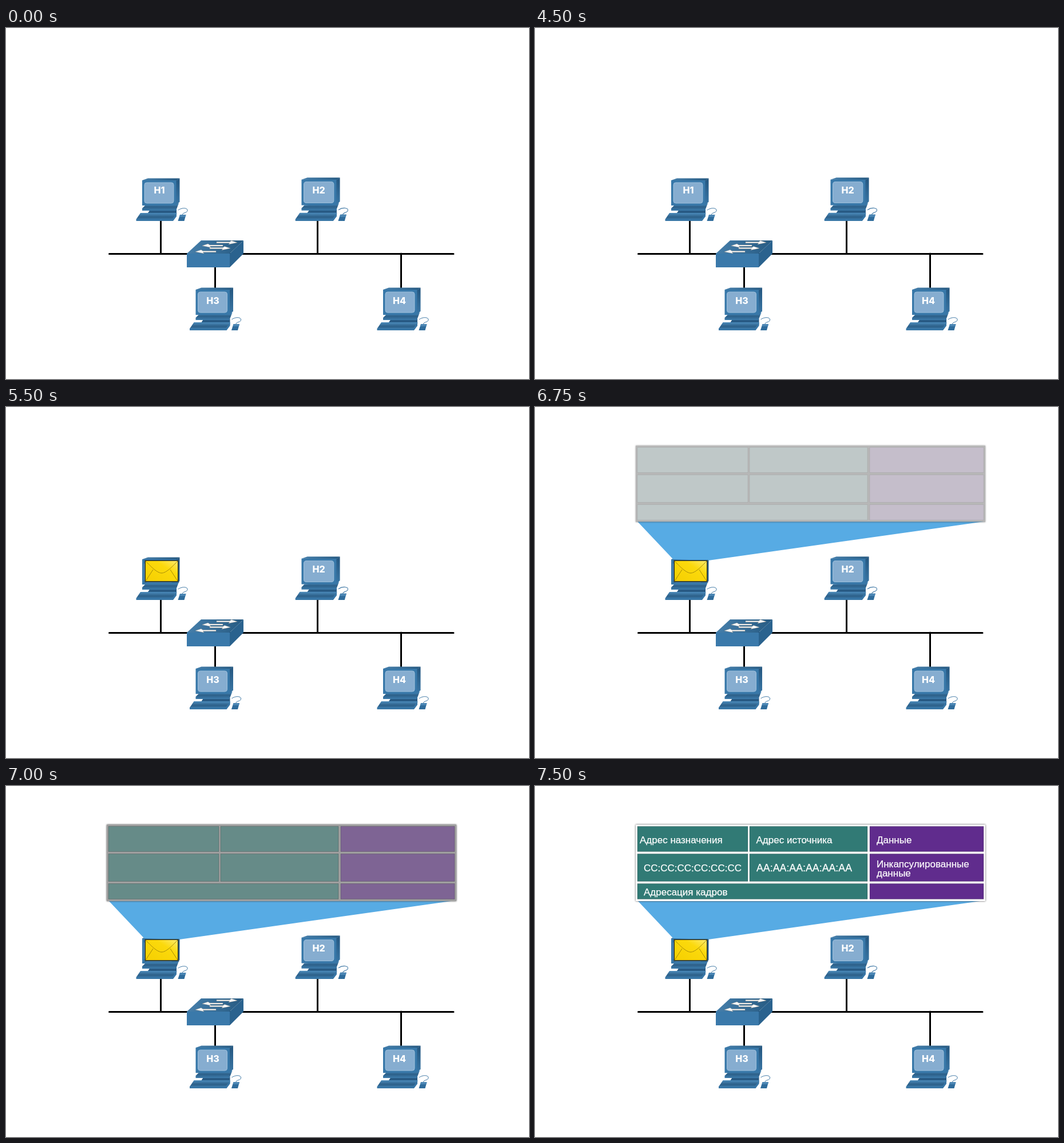
Recreate the animation shown at these times as an HTML page. Size 914x613 px, loop 8 s.

```html
<!DOCTYPE html>
<html lang="ru">
<head>
<meta charset="utf-8">
<style>
  html, body { margin: 0; height: 100%; overflow: hidden; background: #fff; }
  svg { display: block; font: 17px "Liberation Sans", Arial, sans-serif; }
  .label { font: 800 16px Inter, sans-serif; fill: #fff; text-anchor: middle; }
  .wire { fill: none; stroke: #000; stroke-width: 3; stroke-linecap: round; }
  #bubble { filter: drop-shadow(1px 1px 1.5px #9aa); }
  #frame { filter: drop-shadow(0 0 1.5px #444); }
  #address, #payload { stroke: #0003; }
  #words { fill: #fff; stroke: #fff; stroke-width: .25; }
</style>
</head>
<body>
<svg width="914" height="613" viewBox="0 0 914 613">
  <defs>
    <linearGradient id="metal" x2="0" y2="1">
      <stop stop-color="#4b8bbb"/><stop offset=".5" stop-color="#2d6089"/><stop offset="1" stop-color="#3d7cac"/>
    </linearGradient>
    <linearGradient id="side" x2="0" y2="1">
      <stop stop-color="#24567f"/><stop offset="1" stop-color="#3a77a6"/>
    </linearGradient>
    <linearGradient id="lid">
      <stop stop-color="#467fab"/><stop offset="1" stop-color="#265a82"/>
    </linearGradient>
    <linearGradient id="gold" x1="0" y1="1" x2="1" y2="0">
      <stop stop-color="#f5cf00"/><stop offset=".65" stop-color="#fbd90c"/><stop offset="1" stop-color="#fdeb70"/>
    </linearGradient>
    <g id="pc">
      <path d="M301 318C308 313 318 314 317 319S309 321 308 327" fill="none" stroke="#3f78a5"/>
      <path d="M304 326h10.500l-3 11h-11z" fill="#2f6c9c"/>
      <path d="M304.500 326h10l-1 4h-10.500z" fill="#4b86b4"/>
      <path d="M252 317h46v6l-6 3h-46z" fill="#285a84"/>
      <path d="M243 310l59-4-5 13h-59v-4z" fill="url(#metal)"/>
      <path d="M235 323h63.500l-1 6-6 8h-64v-3z" fill="url(#metal)"/>
      <path d="M228 333h63l7-9v5l-6 8h-64z" fill="#3876a6"/>
      <path d="M238 266l10-3.500h55.500l-6 4.500z" fill="url(#lid)"/>
      <path d="M297 267l6.500-4.500v41l-6.500 6.500z" fill="url(#side)"/>
      <path d="M238 266h59.500v44H238z" fill="#3878a9"/>
      <rect x="242" y="270" width="51" height="36" rx="4" fill="#86add0" stroke="#9dbfdb"/>
    </g>
    <path id="arrow" d="M-1-1H22l3-2 10 3.300-15 3 2-2.300H-1z" fill="#fff" stroke="#b9a58f" stroke-width=".4"/>
  </defs>

  <path class="wire" d="M180.500 394.500H782M270.500 337V394M544.500 337V394M365.500 418V453M690.500 394V453"/>

  <path d="M316 394l25-23h74l-24 23z" fill="url(#lid)"/>
  <path d="M391 394l24-23v23l-24 24z" fill="#2a628e"/>
  <path d="M316 394h75v24h-75z" fill="#3a79aa"/>
  <use href="#arrow" x="369" y="374.500"/>
  <use href="#arrow" transform="translate(378 380) scale(-1 1)"/>
  <use href="#arrow" x="357" y="384.500"/>
  <use href="#arrow" transform="translate(366 390.500) scale(-1 1)"/>

  <use href="#pc"/>
  <use href="#pc" transform="translate(272.500 -6) scale(1.025 1.018)"/>
  <use href="#pc" x="93.500" y="191"/>
  <use href="#pc" x="421" y="191"/>
  <g class="label">
    <text x="268" y="288.500">H1</text><text x="546.500" y="288.500">H2</text>
    <text x="361.500" y="481.500">H3</text><text x="687.500" y="481.500">H4</text>
  </g>

  <g id="bubble">
    <rect x="21" y="266.500" width="169.500" height="129" rx="7" fill="#fff" stroke="#24356a" stroke-width="1.800"/>
    <path d="M191.500 320L212 338H191.500z" fill="#fff"/>
  </g>
  <g id="speech">
    <text x="28" y="290">Мне нужно</text><text x="28" y="318">отправить</text>
    <text x="28" y="346">информацию на</text><text x="28" y="374">H3.</text>
  </g>

  <path id="beam" fill="#57abe4"/>

  <g id="mail">
    <path d="M242 267h60.500v39.500H242z" fill="#2c5573"/>
    <path d="M243.500 268.500h57v36h-57z" fill="url(#gold)" stroke="#3b3410"/>
    <path d="M244 269C258 284 266 290 272 290S286 284 300 269M244 304L257 284M300 304L287 284" fill="none" stroke="#a58a08"/>
  </g>

  <g id="table">
    <rect id="frame" x="176" y="67.500" width="611" height="133.500"/>
    <path id="address" d="M179 70.500h193v44H179zM375 70.500h206v44H375zM179 118.500h193v48H179zM375 118.500h206v48H375zM179 170.500h402v27H179z"/>
    <path id="payload" d="M585 70.500h199v44H585zM585 118.500h199v48H585zM585 170.500h199v27H585z"/>
    <g id="words">
      <text x="183" y="100">Адрес назначения</text>
      <text x="386.500" y="100">Адрес источника</text>
      <text x="597" y="100">Данные</text>
      <text x="190" y="149">CC:CC:CC:CC:CC:CC</text>
      <text x="387" y="149" font-size="17.800">AA:AA:AA:AA:AA:AA</text>
      <text x="597" y="142">Инкапсулированные</text>
      <text x="597" y="158">данные</text>
      <text x="190" y="191">Адресация кадров</text>
    </g>
  </g>
</svg>
<script>
const el = id => document.getElementById(id);
const show = (id, on) => el(id).style.display = on ? '' : 'none';
const mix = (from, to, k) => `rgb(${to.map(c => Math.round(from + (c - from) * k))})`;

function draw() {
  // Everything advances in quarter-second steps.
  const t = Math.floor(performance.now() % 8000 / 250) * 250;
  const talking = t >= 1250 && t < 4500;
  show('bubble', talking);
  show('speech', talking);
  show('mail', t >= 5500);
  show('beam', t >= 6500);
  show('table', t >= 6750);
  show('words', t >= 7500);

  // The beam is uncovered from the bottom up.
  const top = t < 6750 ? 234 : 200;
  const left = 179 + (top - 200) * 0.94;
  const right = 303 + (268 - top) * 7.09;
  el('beam').setAttribute('d', `M241.5 266L${left} ${top}H${right}L303 268z`);

  const fade = Math.max(0, t - 6500) / 1000;
  el('table').style.opacity = Math.min(1, fade * 2);
  el('frame').style.fill = mix(65, [255, 255, 255], fade);
  el('address').style.fill = mix(155, [49, 122, 117], fade);
  el('payload').style.fill = mix(155, [96, 44, 141], fade);
  requestAnimationFrame(draw);
}
draw();
</script>
</body>
</html>
```
